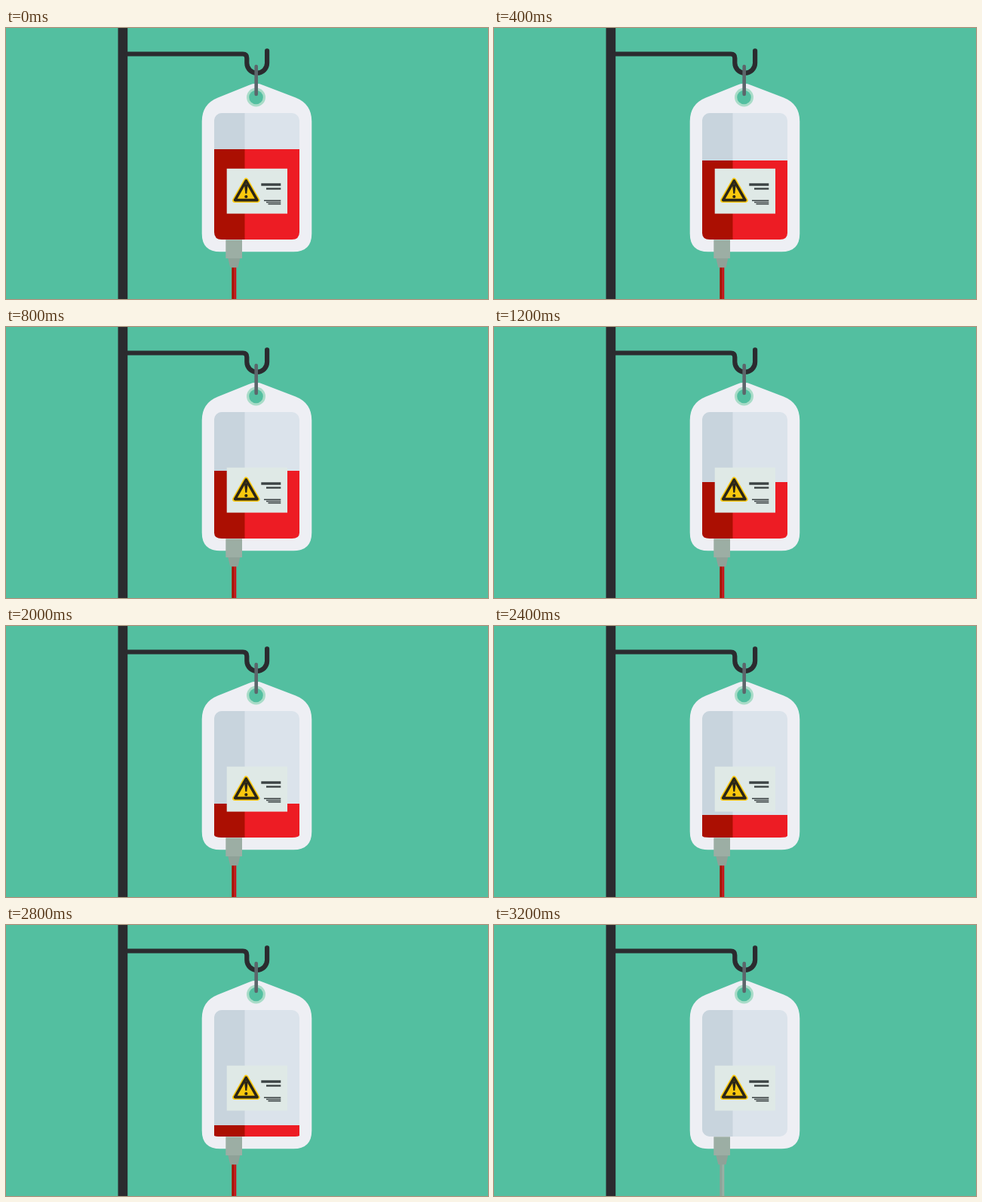
Write an HTML page that moves like this. It is 639 px wide and 360 px high and loops after 4.2 s.

```html
<!DOCTYPE html>
<html lang="en">
<head>
<meta charset="utf-8">
<title>Blood bag</title>
<style>
  html, body { margin: 0; width: 100%; height: 100%; overflow: hidden; background: #53bfa0; }
  svg { display: block; width: 100%; height: 100%; }
</style>
</head>
<body>
<svg viewBox="0 0 639 360">
  <defs>
    <clipPath id="pouch"><rect x="276" y="113" width="113" height="168" rx="10"/></clipPath>
  </defs>
  <rect width="639" height="360" fill="#53bfa0"/>

  <!-- stand -->
  <rect x="148.5" width="12.7" height="360" fill="#2b2b2f"/>
  <path d="M160 34.5H314Q319.3 34.5 319.3 40V46.5a13.4 13.4 0 0 0 26.8 0V30.3"
        fill="none" stroke="#2b2b2f" stroke-width="6.2" stroke-linecap="round"/>

  <!-- bag -->
  <path d="M322 76Q331.500 71.500 341 76L384 92.500Q405.300 101 405.300 124V273Q405.300 297.300 381 297.300H284Q259.700 297.300 259.700 273V124Q259.700 101 281 92.500Z" fill="#eeeff4"/>
  <circle cx="331.500" cy="92" r="12.500" fill="#a9dcc8"/>
  <circle cx="331.500" cy="92" r="9.300" fill="#53bfa0"/>
  <path d="M331.700 51V88" stroke="#5c666b" stroke-width="4.600" stroke-linecap="round"/>
  <g clip-path="url(#pouch)">
    <path d="M276 113H389V281H276Z" fill="#dbe3eb"/>
    <path d="M276 113H316.500V281H276Z" fill="#c8d4dd"/>
  </g>

  <!-- liquid, squashed towards the bottom as it drains -->
  <g id="blood">
    <path d="M316 161H389V271Q389 281 379 281H316Z" fill="#ed1c24"/>
    <path d="M276 161H316.500V281H286Q276 281 276 271Z" fill="#ab0f02"/>
  </g>

  <!-- label -->
  <rect x="292.700" y="186.800" width="80.300" height="59.800" fill="#dfe9e6"/>
  <g stroke-linejoin="round">
    <path d="M318.300 202.500L333.300 228.800H303.300Z" fill="#f9c80e" stroke="#f9c80e" stroke-width="6.500"/>
    <path d="M318.300 202.800L333 228.600H303.600Z" fill="#f9c80e" stroke="#2b2618" stroke-width="3.600"/>
  </g>
  <path d="M316 208.500Q318.300 205.800 320.600 208.500L319.300 220H317.300Z" fill="#2b2618"/>
  <circle cx="318.300" cy="224" r="2.100" fill="#2b2618"/>
  <g fill="none" stroke="#3b4243">
    <path d="M338.300 208H364.300" stroke-width="3.400"/>
    <path d="M345 213.500H364.300" stroke-width="2.400"/>
    <path d="M342 229.200H364.300M345 231.500H364.300M347.500 233.800H364.300" stroke-width="1.400"/>
  </g>

  <!-- outlet -->
  <g id="tube">
    <path d="M299.300 316H302.500V360H299.300Z"/>
    <path d="M302.300 316H305.300V360H302.300Z"/>
  </g>
  <path d="M291.300 281.300H313V306H291.300Z" fill="#9caea4"/>
  <path d="M294.300 306H310.300L307.500 318.300H297.300Z" fill="#8fa298"/>
</svg>
<script>
  const LOOP = 4200, STEP = 400, LAST = 8;
  const BOTTOM = 281, HEIGHT = 120;
  const blood = document.getElementById('blood');
  const halves = document.getElementById('tube').children;

  function render(time) {
    const step = Math.min(LAST, Math.floor((time % LOOP) / STEP));
    const empty = step === LAST;
    const scale = (HEIGHT - Math.round(step * HEIGHT / LAST)) / HEIGHT;

    blood.setAttribute('transform', `translate(0 ${BOTTOM}) scale(1 ${scale}) translate(0 ${-BOTTOM})`);
    blood.setAttribute('visibility', empty ? 'hidden' : 'visible');
    halves[0].setAttribute('fill', empty ? '#8fa298' : '#ab0f02');
    halves[1].setAttribute('fill', empty ? '#9caea4' : '#c8141a');
  }

  const start = performance.now();
  function tick() {
    render(performance.now() - start);
    requestAnimationFrame(tick);
  }
  tick();
</script>
</body>
</html>
```
